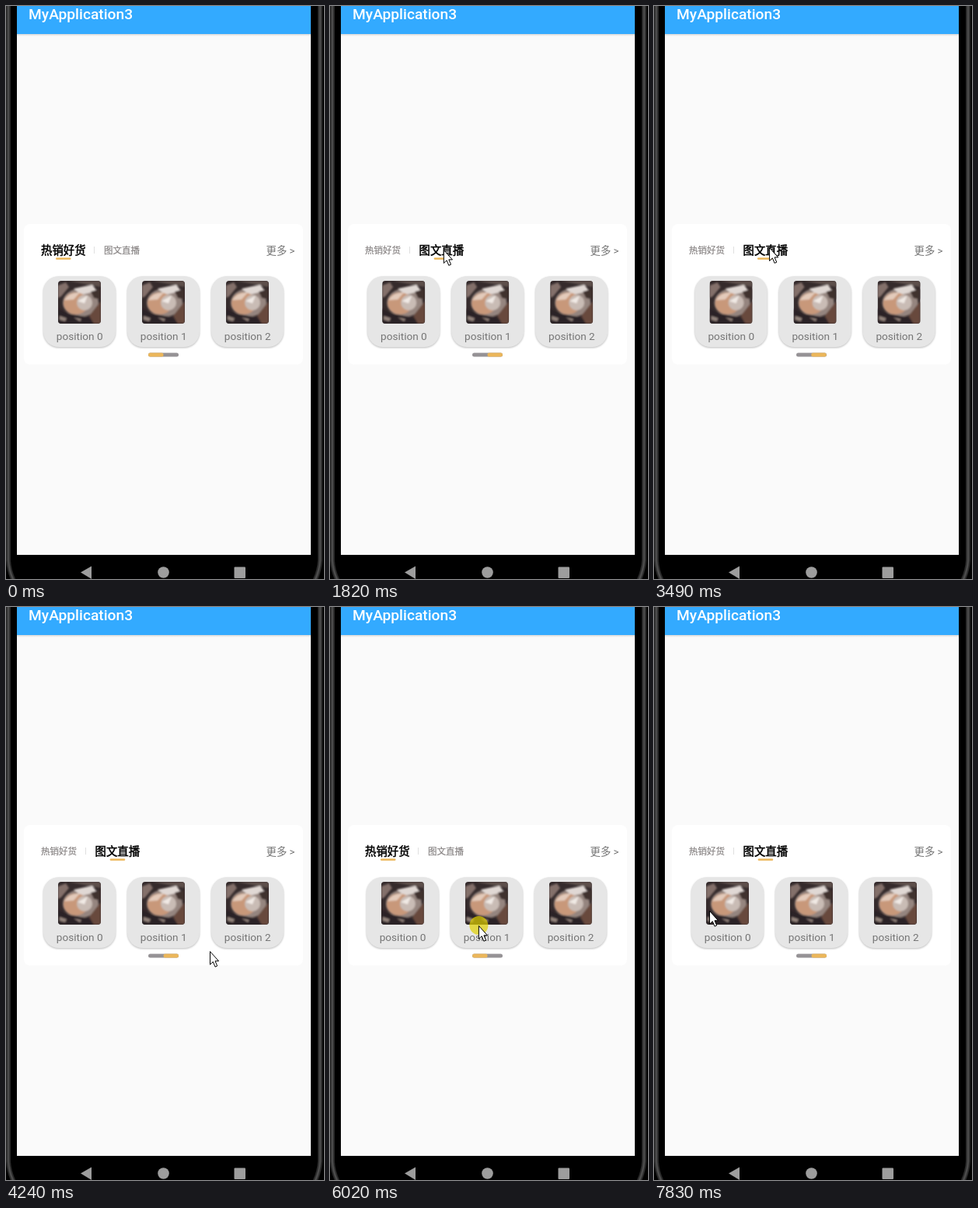
These frames come from a looping animation (409 by 736 pixels, 8000 ms). An HTML page:

```html
<!DOCTYPE html>
<html lang="zh-CN">
<head>
<meta charset="utf-8">
<title>MyApplication3</title>
<style>
html, body { margin: 0; height: 100%; overflow: hidden; background: #000; }
svg { display: block; width: 100%; height: 100%; }
text { font-family: Roboto, 'Noto Sans CJK SC', 'Noto Sans CJK', sans-serif; }
.tab { font-size: 11.5px; fill: #858080; stroke: #858080; stroke-width: .2; }
.tab.on { font-size: 14.4px; fill: #000; stroke: #000; stroke-width: .5; }
.card { fill: #e6e6e6; filter: drop-shadow(0 1px 1.2px #0004); }
.label { font-size: 13.6px; fill: #757575; text-anchor: middle; }
.bezel { fill: none; stroke: #2a2a2a; stroke-width: 6; }
.bezel + .bezel { stroke: #4c4c4c; stroke-width: 2.5; }
</style>
</head>
<body>
<svg viewBox="0 0 409 736">
  <defs>
    <linearGradient id="shade" x2="0" y2="1">
      <stop offset="0" stop-color="#000" stop-opacity=".14"/><stop offset="1" stop-color="#000" stop-opacity="0"/>
    </linearGradient>
    <filter id="soft" x="-10%" y="-10%" width="120%" height="120%"><feGaussianBlur stdDeviation="1"/></filter>
    <clipPath id="view"><rect x="33" y="340" width="339" height="104"/></clipPath>
    <clipPath id="round"><rect width="55" height="55" rx="4"/></clipPath>
    <g id="photo" clip-path="url(#round)">
      <rect width="55" height="55" fill="#352b2c"/>
      <g filter="url(#soft)">
        <path d="M0 6L10 2 14 8 4 20 0 22Z" fill="#83706a"/>
        <path d="M14 0H55V8L34 4Z" fill="#5d4f4c"/>
        <ellipse cx="29" cy="28" rx="23" ry="18" fill="#95857f"/>
        <path d="M20 10L44 5 50 13 30 18Z" fill="#e0d8d4"/>
        <path d="M42 14L55 10V24L46 22Z" fill="#40312f"/>
        <ellipse cx="23" cy="29" rx="16" ry="14" fill="#c8987a"/>
        <path d="M8 25Q14 14 28 15L20 24Z" fill="#e3cbbb"/>
        <ellipse cx="34" cy="28" rx="10" ry="10" fill="#c9bcb5"/>
        <path d="M25 26L38 19 34 29Z" fill="#f0e9e4"/>
        <path d="M55 26L40 45 46 55H55Z" fill="#67493d"/>
        <path d="M0 36L12 42 40 47 46 55H0Z" fill="#2c2426"/>
        <path d="M2 45L11 48 9 52 2 50ZM20 47L30 49 28 52Z" fill="#93837c"/>
      </g>
    </g>
  </defs>

  <rect width="409" height="736"/>
  <g id="bezels"></g>
  <rect x="14" width="378" height="705" fill="#fafafa"/>
  <rect x="14" width="378" height="36" fill="#33aaff"/>
  <rect x="14" y="36" width="378" height="3" fill="url(#shade)"/>
  <text x="29" y="17" font-size="19.2" font-weight="500" fill="#fff">MyApplication3</text>

  <rect x="23" y="280" width="359" height="180.5" rx="8" fill="#fff"/>
  <text class="tab" x="45" id="tabA">热销好货</text>
  <text class="tab" id="tabB">图文直播</text>
  <rect id="divider" y="309" width="1" height="9" fill="#e0e0e0"/>
  <text x="334.5" y="318.5" font-size="13.4" fill="#757575">更多 &gt;</text>
  <rect id="line" y="323.3" width="19.5" height="2.4" rx="1.2" fill="#ebb65a"/>

  <g clip-path="url(#view)"><g id="pager"></g></g>

  <rect x="183" y="445.5" width="39" height="5" rx="2.5" fill="#959295"/>
  <rect id="thumb" y="445.5" width="19.5" height="5" rx="2.5" fill="#ebb65a"/>

  <g fill="#9d9d9d">
    <path d="M96 727.5L110 719.5V736Z"/>
    <circle cx="202.5" cy="727.5" r="7.3"/>
    <rect x="293.5" y="720.5" width="14.5" height="14.5" rx="1"/>
  </g>

  <g id="cursor">
    <circle id="press" cx=".5" r="12" fill="#e0d000" fill-opacity=".7"/>
    <path d="M.5 .5V17.3L4.3 13.7 7 20.2 9.7 19 7 12.8H11.6Z" fill="#fff" stroke="#000"/>
  </g>
</svg>
<script>
const LOOP = 8000, PAGE = 339.5, DRAG = 200, SETTLE = 400, TAP = 110, LAG = 30;
const $ = id => document.getElementById(id);
const clamp = p => Math.max(0, Math.min(1, p));
const mix = (a, b, p) => a + (b - a) * p;
const smooth = p => p * p * (3 - 2 * p);
const quint = p => 1 - (1 - p) ** 5;

// Each gesture is let go at a time and picks a page; drags also pull the pager by some pixels
const gestures = [
  { up: 1480, page: 1 },
  { up: 2615, page: 0 },
  { up: 3230, page: 1 },
  { up: 5260, page: 0, pull: -109 },
  { up: 6208, page: 1, pull: 92 }
];
// Pointer moves: start, end, x, y; it rests in between
const moves = [
  [0, 70, 343, 634], [80, 150, 333, 623], [330, 1020, 180, 374], [1020, 1300, 148, 313],
  [1750, 2440, 75, 314], [2780, 3100, 148, 310], [3480, 4240, 262, 442],
  [4420, 5000, 205, 405], [5060, 5260, 314, 407], [5640, 5980, 192, 409],
  [6008, 6208, 100, 412], [6208, 6480, 207, 416], [6480, 6820, 237, 405], [7300, 7830, 71, 390]
];

$('bezels').innerHTML = ['', 'translate(407 0) scale(-1 1)'].map(m => `<g transform="${m}">` +
  '<path class="bezel" d="M3 -5V712Q4 728 12 742"/>'.repeat(2) + '</g>').join('');

for (let i = 0; i < 6; i++) {
  const x = 48 + (i % 3) * 108 + (i > 2 ? PAGE : 0);
  $('pager').innerHTML += `<g transform="translate(${x} 347)">
    <rect class="card" width="93" height="91" rx="20"/>
    <use href="#photo" x="19" y="6"/>
    <text class="label" x="46.7" y="82">position ${i % 3}</text></g>`;
}

function stateAt(t) {
  let x = 0, page = 0, pressed = false;
  for (const { up, page: next, pull = 0 } of gestures) {
    const down = up - (pull ? DRAG + 30 : TAP), go = up + (pull ? 0 : LAG);
    pressed ||= t >= down && t < up;
    x += pull * smooth(clamp((t - up + DRAG) / DRAG));
    x = mix(x, next * PAGE, quint(clamp((t - go) / SETTLE)));
    if (t >= up) page = next;
    else break;
  }
  return { x, page, pressed };
}

function pointAt(t) {
  let x = 343, y = 634;
  for (const [a, b, u, v] of moves) {
    const p = smooth(clamp((t - a) / (b - a)));
    x = mix(x, u, p);
    y = mix(y, v, p);
  }
  return [x, y];
}

function setTab(el, on) {
  el.classList.toggle('on', on);
  el.setAttribute('y', on ? 319 : 317.9);
}

function draw(now) {
  const t = now % LOOP, { x, page, pressed } = stateAt(t), part = x / PAGE;
  $('pager').setAttribute('transform', `translate(${-x} 0)`);
  $('line').setAttribute('x', 64 + 69.7 * part ** .75);
  $('thumb').setAttribute('x', 183 + 19.5 * part);
  setTab($('tabA'), !page);
  setTab($('tabB'), !!page);
  $('tabB').setAttribute('x', page ? 114.5 : 126);
  $('divider').setAttribute('x', page ? 102 : 113);
  $('cursor').setAttribute('transform', `translate(${pointAt(t)})`);
  $('cursor').setAttribute('visibility', t < 70 ? 'hidden' : 'visible');
  $('press').setAttribute('opacity', pressed ? 1 : 0);
  requestAnimationFrame(() => draw(performance.now()));
}
draw(0);
</script>
</body>
</html>
```
